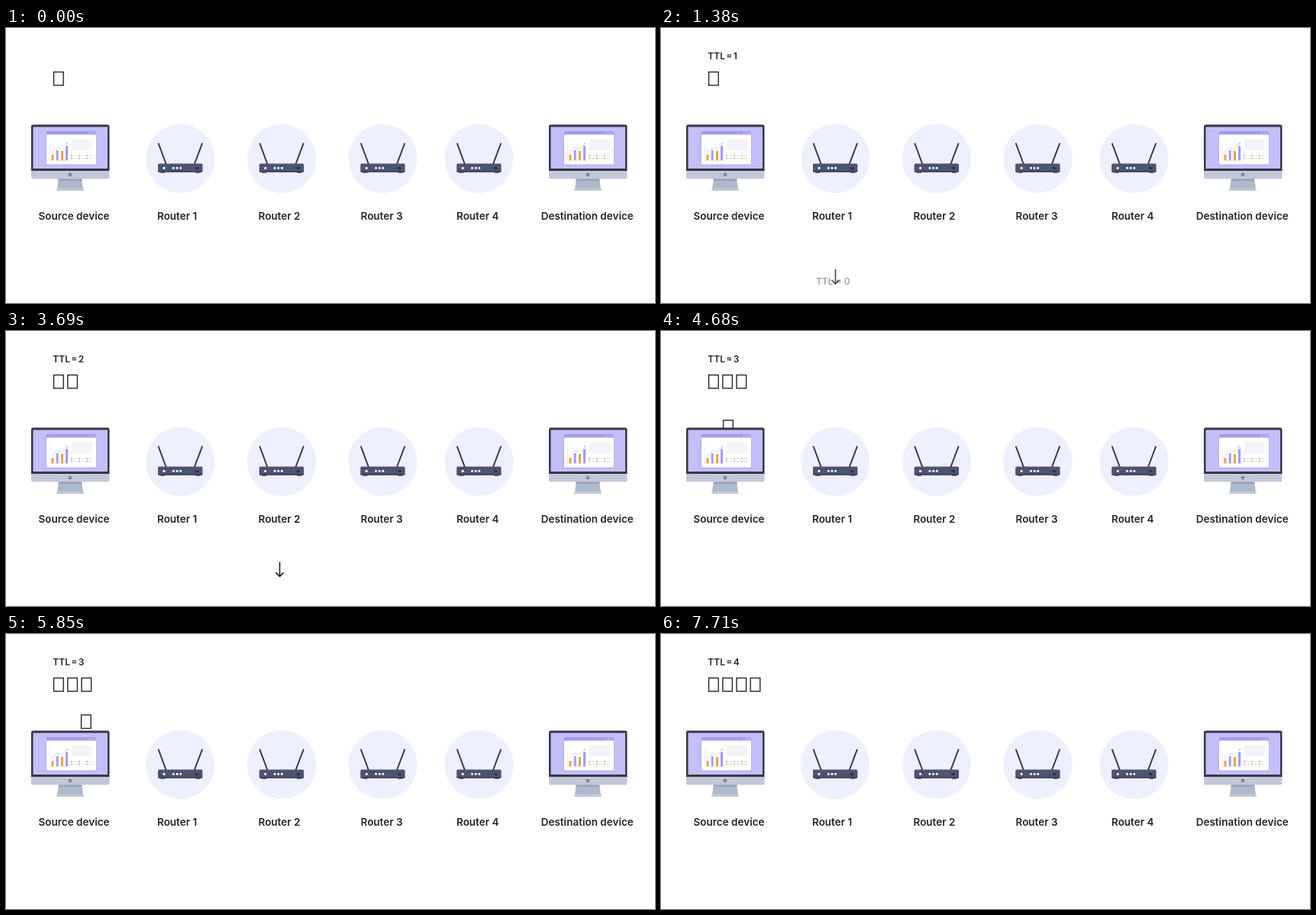
These frames come from a looping animation (850x360 px, 8 s). An HTML page:

```html
<!DOCTYPE html>
<html lang="en">
<head>
<meta charset="utf-8">
<title>TTL and routers</title>
<style>
  html, body { margin: 0; width: 100%; height: 100%; overflow: hidden; background: #fff; }
  svg { display: block; width: 850px; height: 360px; }
  text { font-family: Inter, "Open Sans", sans-serif; fill: #23252f; white-space: pre; }
  .label { font-size: 13.5px; font-weight: 600; }
  .ttl { font-size: 12px; font-weight: 600; word-spacing: -1.6px; }
  .zero { font-size: 12px; font-weight: 500; }
  .line { fill: none; stroke: #26272e; stroke-width: 1.4; }
</style>
</head>
<body>
<svg viewBox="0 0 850 360" xmlns="http://www.w3.org/2000/svg">
  <defs>
    <g id="monitor">
      <path d="M69 196H99L101 210.5H67Z" fill="#aeb9cd"/>
      <path d="M69 196H99L99.5 200H68.5Z" fill="#98a3ba"/>
      <rect x="66" y="210.5" width="36" height="2.5" rx="1" fill="#bcc5d6"/>
      <path d="M33 186H135.500V195Q135.500 197.500 133 197.500H35.500Q33 197.500 33 195Z" fill="#c1c8d9"/>
      <circle cx="84" cy="192" r="2.500" fill="#858c9f"/>
      <path d="M33 187V129Q33 126.500 35.500 126.500H133Q135.500 126.500 135.500 129V187Z" fill="#353746"/>
      <rect x="35.500" y="129.500" width="97.500" height="54.500" fill="#c3bff8"/>
      <rect x="51.500" y="138" width="67.500" height="42" rx="2" fill="#aaa4ea" opacity=".45"/>
      <rect x="53" y="135" width="65" height="8" rx="1.500" fill="#a39bf0"/>
      <g fill="#c9c5fa"><circle cx="108.500" cy="137.300" r="1"/><circle cx="112" cy="137.300" r="1"/><circle cx="115.500" cy="137.300" r="1"/></g>
      <rect x="53" y="139.500" width="65" height="39" rx="1.500" fill="#fff"/>
      <path d="M57.500 151V173.500H82" fill="none" stroke="#e5e5ee" stroke-width=".7"/>
      <g fill="#eaa63c"><rect x="59.500" y="166" width="3" height="7.300"/><rect x="72" y="161" width="3" height="12.300"/></g>
      <g fill="#a49cf0"><rect x="65.700" y="160" width="3" height="13.300"/><rect x="78" y="154.500" width="3.200" height="18.800"/></g>
      <path d="M60 163L67 156.500L73 158.500L80 151.500" fill="none" stroke="#c9c9d6" stroke-width=".8"/>
      <circle cx="80" cy="151.300" r="1" fill="#b6b2dd"/>
      <rect x="86" y="146" width="27" height="14" fill="#f4f4f8"/>
      <g id="legend"></g>
    </g>
    <g id="router">
      <circle r="45" fill="#eeefff"/>
      <g stroke="#363a4a" stroke-width="2" stroke-linecap="round">
        <path d="M-28.500 -19.500L-18.700 7M28.500 -19.500L18.500 7"/>
      </g>
      <path d="M-26 17H-20V18.800H-26ZM20 17H26V18.800H20Z" fill="#363c54"/>
      <rect x="-29.300" y="6.500" width="58.400" height="11.300" rx="1.600" fill="#4c5472"/>
      <rect x="-29" y="16" width="57.800" height="1.800" rx=".8" fill="#3c435d"/>
      <g fill="#fff"><circle cx="-21.300" cy="12.300" r="1.600"/><circle cx="-9" cy="12.300" r="1.500"/><circle cx="-4.300" cy="12.300" r="1.500"/><circle cx=".3" cy="12.300" r="1.500"/></g>
      <path d="M19.500 11H24V14H19.500Z" fill="#2e3448"/>
    </g>
  </defs>
  <rect width="850" height="360" fill="#fff"/>
  <rect id="packet" class="line" width="12.600" height="17.600"/>
  <path id="arrow" class="line" style="stroke-width:1.700" d="M0 -20V-1M-5.200 -6L0 -.8L5.200 -6"/>
  <g id="scene"></g>
  <g id="boxes"></g>
  <text id="ttl" class="ttl" x="61.300" y="41"></text>
  <text id="zero" class="zero" y="335.500">TTL = 0</text>
</svg>
<script>
const LOOP = 8000, STEP = 30;
const el = id => document.getElementById(id);
const set = (id, attrs) => { for (const k in attrs) el(id).setAttribute(k, attrs[k]); };

// static scene
const routerX = [228.3, 361, 493.5, 619.5];
const labels = [["Source device", 42.5], ["Router 1", 198], ["Router 2", 330.5],
  ["Router 3", 464.5], ["Router 4", 590], ["Destination device", 700.7]];
el("scene").innerHTML =
  '<use href="#monitor"/><use href="#monitor" x="678"/>' +
  routerX.map(x => `<use href="#router" x="${x}" y="171"/>`).join("") +
  labels.map(([s, x]) => `<text class="label" x="${x}" y="251.3">${s}</text>`).join("");

el("legend").innerHTML = [167, 170.5].map((y, r) => [86, 96, 106].map((x, c) =>
  `<circle cx="${x}" cy="${y}" r="1" fill="${(r + c) % 2 ? "#eaa63c" : "#a49cf0"}"/>` +
  `<rect x="${x + 2}" y="${y - .4}" width="5" height=".9" fill="#d9d9e4"/>`).join("")).join("");

el("boxes").innerHTML = [0, 1, 2, 3].map(i =>
  `<rect class="line" x="${62.6 + i * 18.2}" y="57.600" width="12.600" height="17.400"/>`).join("");
const boxes = [...el("boxes").children];

// rounds: start, exit clock offset, arrow x, text x
const rounds = [
  { at: -30, shift: 5797, arrow: 228.5, text: 203 },
  { at: 1770, shift: 3354, arrow: 358.5, text: 335 },
  { at: 4320, shift: 0, arrow: 494.3, text: 469 },
  { at: 7650 }
];
// flights: start, duration, router, peak
const flights = [
  [15, 555, 0, 37],
  [1945, 555, 0, 37], [2522, 560, 1, 44],
  [4625, 555, 0, 37], [5200, 600, 1, 44], [5768, 600, 2, 44]
];
const fall = [[6360, 212], [6570, 246], [7080, 328], [7180, 336], [7260, 338]];
const homeX = 84, homeY = 160;

const clamp = v => Math.max(0, Math.min(1, v));
function track(keys, t) {
  for (let i = 1; i < keys.length; i++) {
    const [a, va] = keys[i - 1], [b, vb] = keys[i];
    if (t <= b) return va + (vb - va) * clamp((t - a) / (b - a));
  }
  return keys[keys.length - 1][1];
}

function drawPacket(t) {
  const f = flights.find(([at, len]) => t >= at && t < at + len * 0.925);
  set("packet", { opacity: f ? 1 : 0 });
  if (!f) return;
  const [at, len, to, peak] = f, u = (t - at) / len;
  const x = homeX + (routerX[to] - homeX) * u * u * (3 - 2 * u);
  const y = homeY - (homeY - peak) * 4 * u * (1 - u);
  set("packet", { x: x - 6.3, y: y + 0.7 });
}

function drawExit(t, r) {
  const c = r.arrow ? t + r.shift : 0;
  set("arrow", { opacity: c < 6360 ? 0 : 1 - clamp((c - 7150) / 140) });
  set("zero", { opacity: clamp((c - 7080) / 205) });
  if (!r.arrow) return;
  set("arrow", { transform: `translate(${r.arrow} ${track(fall, c)})` });
  set("zero", { x: r.text });
}

function draw(now) {
  const t = Math.floor((now % LOOP) / STEP) * STEP;
  const i = rounds.filter(r => t >= r.at).length - 1, r = rounds[i];
  const age = t - r.at, count = age >= 30 ? i + 1 : i;
  boxes.forEach((b, k) => b.setAttribute("opacity", k < count ? 1 : 0));
  el("ttl").textContent = age >= 60 ? `TTL = ${i + 1}` : "";
  drawPacket(t);
  drawExit(t, r);
}

const begin = performance.now();
function tick() {
  draw(performance.now() - begin);
  requestAnimationFrame(tick);
}
tick();
</script>
</body>
</html>
```
